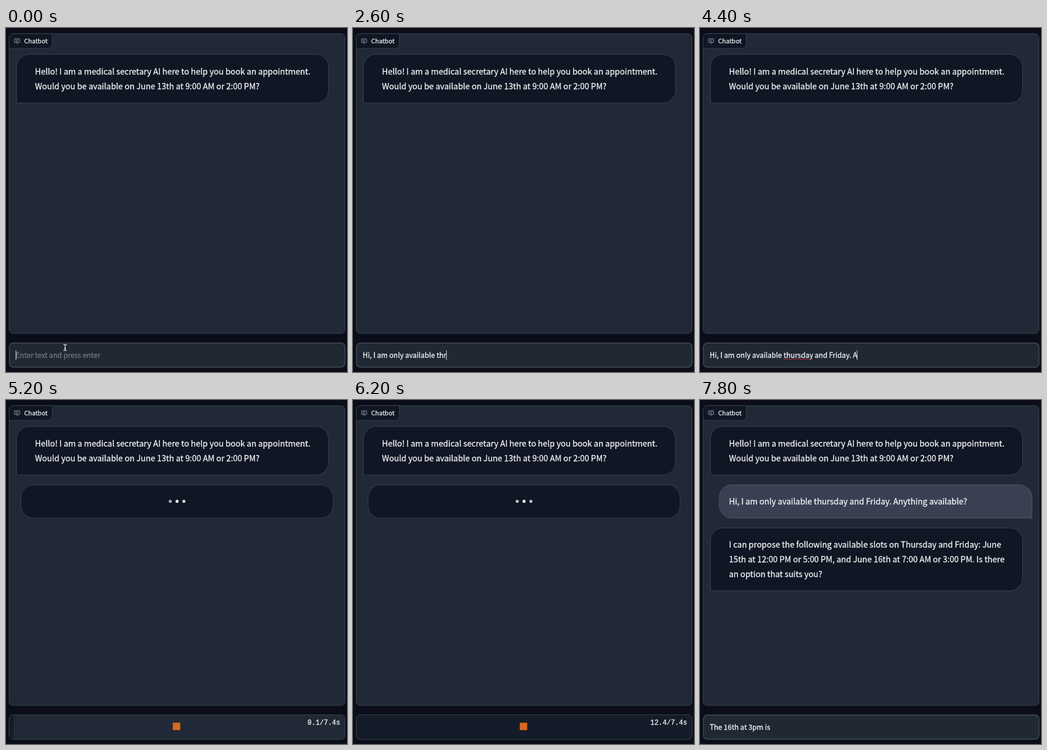
An HTML page with a canvas for the animation above (8 s loop, 600 px wide and 606 px high).

```html
<!DOCTYPE html>
<html lang="en">
<head>
<meta charset="utf-8">
<title>Chatbot</title>
<style>
  html, body { margin: 0; width: 100%; height: 100%; overflow: hidden; background: #0b0e19; }
  canvas { display: block; width: 600px; height: 606px; }
</style>
</head>
<body>
<canvas id="stage"></canvas>
<script>
const W = 600, H = 606, STEP = 200, LOOP = 8000;
const SANS = '"Noto Sans CJK JP", "Noto Sans CJK SC", "Noto Sans CJK", sans-serif';
const MONO = '"Liberation Mono", monospace';
const BODY = '14.35px ' + SANS, FIELD = '12.5px ' + SANS, LABEL = '11px ' + SANS;
const PAGE = '#0b0e19', PANEL = '#202935', DARK = '#101623', EDGE = '#37424f';
const INK = '#f1f3f6', ICON = '#a3a9b5';

const greeting = [
  'Hello! I am a medical secretary AI here to help you book an appointment.',
  'Would you be available on June 13th at 9:00 AM or 2:00 PM?'
];
const question = 'Hi, I am only available thursday and Friday. Anything available?';
const reply = [
  'I can propose the following available slots on Thursday and Friday: June',
  '15th at 12:00 PM or 5:00 PM, and June 16th at 7:00 AM or 3:00 PM. Is there',
  'an option that suits you?'
];
const answer = 'The 16th at 3pm is';
const typo = 'Hi, I am only available thr';

const TYPO_STEP = 13, SPELL_STEP = 19, WAIT_STEP = 26, REPLY_STEP = 32, LAST_STEP = 39;
// Typing pace as [step, characters typed]
const questionPace = [[0, 0], [6, 8], [13, 27], [18, 36], [22, 46], [25, question.length]];
const answerPace = [[REPLY_STEP, 0], [36, 11], [LAST_STEP, answer.length]];

const canvas = document.getElementById('stage');
const ctx = canvas.getContext('2d');
const dpr = window.devicePixelRatio || 1;
canvas.width = W * dpr;
canvas.height = H * dpr;

function typed(str, pace, step) {
  const i = pace.findIndex(([s]) => s > step);
  if (i < 0) return str;
  const [s0, n0] = pace[i - 1], [s1, n1] = pace[i];
  return str.slice(0, Math.round(n0 + (n1 - n0) * (step - s0) / (s1 - s0)));
}

function box(x, y, w, h, radii, fill, edge, line = 1) {
  ctx.beginPath();
  ctx.roundRect(x, y, w, h, radii);
  ctx.fillStyle = fill;
  ctx.fill();
  if (!edge) return;
  ctx.strokeStyle = edge;
  ctx.lineWidth = line;
  ctx.stroke();
}

// A hairline outline gives the slightly heavier text weight
function text(str, x, y, font, color = INK, align = 'left') {
  ctx.font = font;
  ctx.textAlign = align;
  ctx.fillStyle = ctx.strokeStyle = color;
  ctx.lineWidth = 0.3;
  ctx.lineJoin = 'round';
  ctx.fillText(str, x, y);
  ctx.strokeText(str, x, y);
}

function line(x1, y1, x2, y2, color, width) {
  ctx.beginPath();
  ctx.moveTo(x1, y1);
  ctx.lineTo(x2, y2);
  ctx.strokeStyle = color;
  ctx.lineWidth = width;
  ctx.stroke();
}

function fieldWidth(str) {
  ctx.font = FIELD;
  return ctx.measureText(str).width;
}

function paragraph(rows, y) {
  rows.forEach((row, i) => text(row, 51, y + i * 26, BODY));
}

function chatIcon() {
  box(15, 19, 9, 6.5, 0.5, DARK, ICON, 0.9);
  line(20.8, 25.5, 19, 28, ICON, 0.9);
  line(17, 21.3, 22, 21.3, ICON, 0.8);
  line(17, 23.4, 20.5, 23.4, ICON, 0.8);
}

function panel() {
  box(5.5, 10, 591, 528, 7, PANEL, EDGE);
  box(5.5, 10, 76, 26, [7, 0, 7, 0], DARK, EDGE);
  chatIcon();
  text('Chatbot', 32, 27, LABEL, '#e5e8ed');
  box(18.5, 46.5, 549, 85.5, [22, 22, 22, 0], DARK, EDGE);
  paragraph(greeting, 82);
}

function pending(waited) {
  box(26.5, 149.5, 549, 58.5, 22, DARK, EDGE);
  for (let i = 0; i < 3; i++) {
    const glow = 0.75 + 0.25 * Math.cos(2 + waited * 1.17 - i * 1.6);
    ctx.beginPath();
    ctx.arc(289 + i * 12, 178.5, 2.7, 0, Math.PI * 2);
    ctx.fillStyle = `rgba(255,255,255,${glow})`;
    ctx.fill();
  }
}

function conversation() {
  box(34, 149.5, 550, 58.5, [22, 22, 0, 22], '#3a4052', '#505767');
  paragraph([question], 184);
  box(18.5, 225.5, 549, 110.5, [22, 22, 22, 0], DARK, EDGE);
  paragraph(reply, 260);
}

function loader(waited) {
  const total = 7.4;
  const spent = Math.max(0.1, 0.3 + (waited - 1) * 3.025);
  box(5.5, 554.5, 591, 43.5, 7, PANEL);
  ctx.save();
  ctx.clip();
  ctx.fillStyle = '#151c29';
  ctx.fillRect(5, 554, 592 * Math.min(1, spent / total), 45);
  ctx.restore();
  ctx.strokeStyle = EDGE;
  ctx.lineWidth = 1;
  ctx.stroke();
  ctx.fillStyle = '#d9691f';
  ctx.fillRect(293.5, 568.5, 13, 13);
  text(`${spent.toFixed(1)}/${total}s`, 588, 572, '12px ' + MONO, '#f4f5f7', 'right');
}

function spellMark() {
  const start = 17 + fieldWidth('Hi, I am only available ');
  ctx.setLineDash([2, 1.2]);
  line(start, 583.3, start + fieldWidth('thursday'), 583.3, '#d3333b', 1.6);
  ctx.setLineDash([]);
}

function field(str, caret) {
  box(6, 555, 590.5, 42.5, 7, '#1f2833', '#3a4451', 1.8);
  if (str) text(str, 17, 581, FIELD);
  else text('Enter text and press enter', 17, 581, FIELD, '#6f7783');
  if (!caret) return;
  const x = Math.floor(17 + fieldWidth(str)) + 0.5;
  line(x, 568, x, 585, '#d5d9df', 1);
}

function pointer(x, y) {
  for (const [color, width] of [[PAGE, 3], ['#ffffff', 1.3]]) {
    line(x, y - 4.5, x, y + 4.5, color, width);
    line(x - 1.5, y + 1.5, x + 1.5, y + 1.5, color, width);
    for (const end of [-5, 5]) line(x - 3, y + end, x + 3, y + end, color, width);
  }
}

function draw(step) {
  ctx.setTransform(dpr, 0, 0, dpr, 0, 0);
  ctx.fillStyle = PAGE;
  ctx.fillRect(0, 0, W, H);
  panel();
  if (step < WAIT_STEP) {
    field(step === TYPO_STEP ? typo : typed(question, questionPace, step), true);
    if (step >= SPELL_STEP) spellMark();
    if (step === 0) pointer(104, 563);
  } else if (step < REPLY_STEP) {
    pending(step - WAIT_STEP);
    loader(step - WAIT_STEP);
  } else {
    conversation();
    field(typed(answer, answerPace, step), step < LAST_STEP);
  }
}

function tick() {
  draw(Math.floor((performance.now() % LOOP) / STEP));
  requestAnimationFrame(tick);
}
tick();
</script>
</body>
</html>
```
